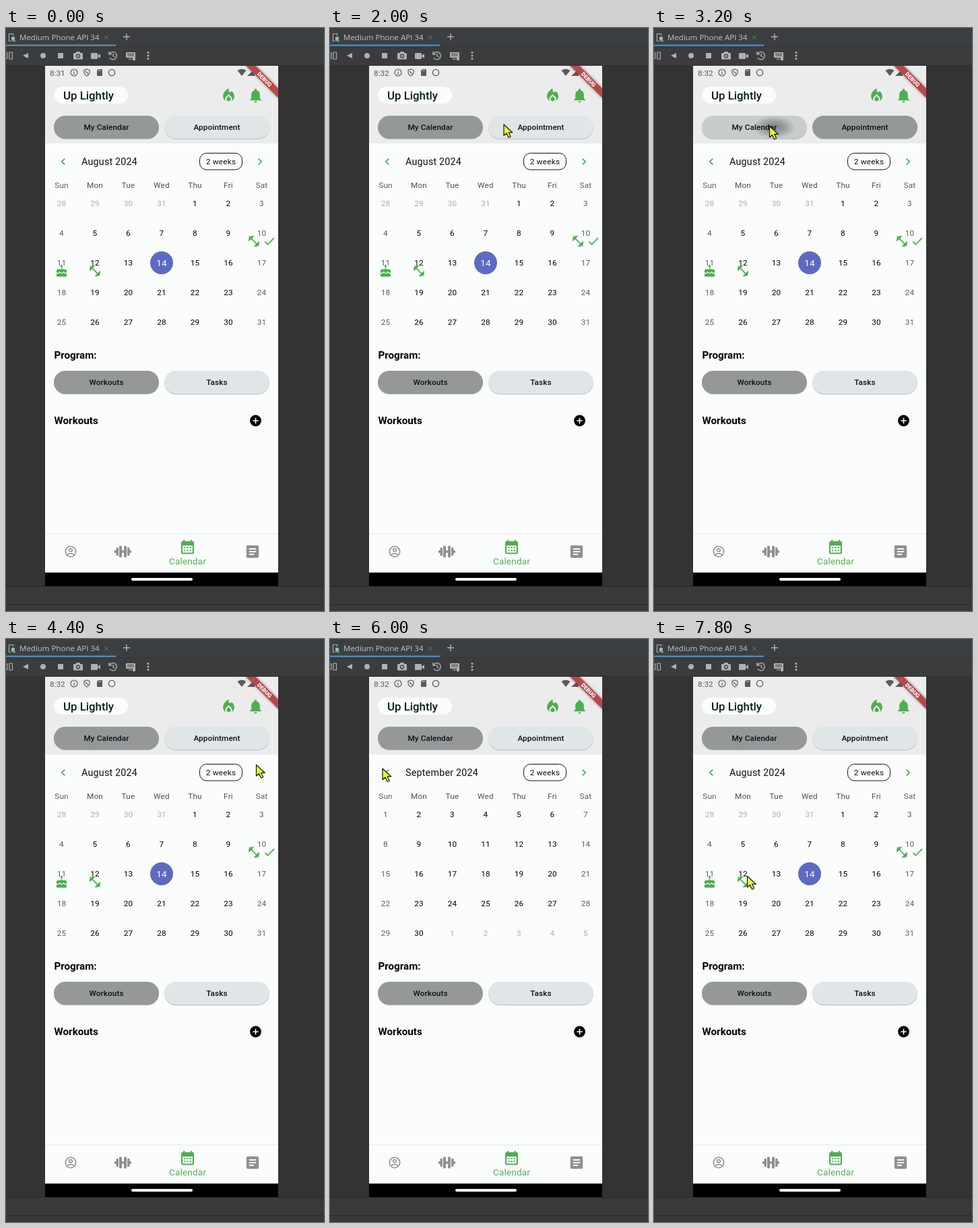
An HTML page that plays this animation: 472x864 px, repeating every 8000 ms.

```html
<!DOCTYPE html>
<html lang="en">
<head>
<meta charset="utf-8">
<style>
html, body { margin: 0; width: 100%; height: 100%; overflow: hidden; background: #333; }
svg { display: block; width: 472px; height: 864px; }
text { font-family: Roboto, sans-serif; font-size: 11.8px; white-space: pre; }
.sp { letter-spacing: .21px; }
</style>
</head>
<body>
<svg id="stage" viewBox="0 0 472 864" xmlns="http://www.w3.org/2000/svg"></svg>
<script>
const GREEN = '#4caf50', GREY = '#8f9190', ON = '#949899', OFF = '#e0e5e7';
const PAGE = '#fbfdfc', TOOL = '#afb1b3', STATUS = '#5b5b5b';

const rect = (x, y, w, h, fill, r = 0, more = '') =>
  `<rect x="${x}" y="${y}" width="${w}" height="${h}" rx="${r}" fill="${fill}" ${more}/>`;
const text = (s, x, y, fill, more = '') => `<text x="${x}" y="${y}" fill="${fill}" ${more}>${s}</text>`;
const mid = (s, x, y, fill, more = '') => text(s, x, y, fill, 'text-anchor="middle" ' + more);
const line = (d, color, w = 1.2) => `<path d="${d}" fill="none" stroke="${color}" stroke-width="${w}"/>`;
const fill = (d, color) => `<path d="${d}" fill="${color}"/>`;
const ring = (x, y, r, color, w = 1.2) =>
  `<circle cx="${x}" cy="${y}" r="${r}" fill="none" stroke="${color}" stroke-width="${w}"/>`;
const dot = (x, y, r, color) => `<circle cx="${x}" cy="${y}" r="${r}" fill="${color}"/>`;

// Icons on a 24 unit grid, centred on (x, y)
const shapes = {
  left: 'M15.41 7.41L14 6l-6 6 6 6 1.41-1.41L10.83 12z',
  right: 'M10 6L8.59 7.41 13.17 12l-4.58 4.59L10 18l6-6z',
  bell: 'M12 22c1.1 0 2-.9 2-2h-4c0 1.1.89 2 2 2zm6-6v-5c0-3.07-1.64-5.64-4.5-6.32V4c0-.83-.67-1.5-1.5-1.5s-1.5.67-1.5 1.5v.68C7.63 5.36 6 7.92 6 11v5l-2 2v1h16v-1l-2-2z',
  fire: 'M12 12.9l-2.13 2.09C9.31 15.55 9 16.28 9 17.06 9 18.68 10.35 20 12 20s3-1.32 3-2.94c0-.78-.31-1.52-.87-2.07zM16 6l-.44.55C14.38 8.02 12 7.19 12 5.3V2S4 6 4 13c0 2.92 1.56 5.47 3.89 6.86-.56-.79-.89-1.76-.89-2.8 0-1.32.52-2.56 1.47-3.5L12 10.1l3.53 3.47c.95.93 1.47 2.17 1.47 3.5 0 1.02-.31 1.96-.85 2.75 1.89-1.15 3.29-3.06 3.71-5.3.66-3.55-1.07-6.9-3.86-8.52z',
  cake: 'M12 6c1.11 0 2-.9 2-2 0-.38-.1-.73-.29-1.03L12 0l-1.71 2.97c-.19.3-.29.65-.29 1.03 0 1.1.9 2 2 2zm4.6 9.99l-1.07-1.07-1.08 1.07c-1.3 1.3-3.58 1.31-4.89 0l-1.07-1.07-1.09 1.07C6.75 16.64 5.88 17 4.96 17c-.73 0-1.4-.23-1.96-.61V21c0 .55.45 1 1 1h16c.55 0 1-.45 1-1v-4.61c-.56.38-1.23.61-1.96.61-.92 0-1.79-.36-2.44-1.01zM18 9h-5V7h-2v2H6c-1.66 0-3 1.34-3 3v1.54c0 1.08.88 1.96 1.96 1.96.52 0 1.02-.2 1.38-.57l2.14-2.13 2.13 2.13c.74.74 2.03.74 2.77 0l2.14-2.13 2.13 2.13c.37.37.86.57 1.38.57 1.08 0 1.96-.88 1.96-1.96V12c0-1.66-1.34-3-3-3z',
  weights: 'M20.57 14.86L22 13.43 20.57 12 17 15.57 8.43 7 12 3.43 10.57 2 9.14 3.43 7.71 2 5.57 4.14 4.14 2.71 2.71 4.14l1.43 1.43L2 7.71l1.43 1.43L2 10.57 3.43 12 7 8.43 15.57 17 12 20.57 13.43 22l1.43-1.43L16.29 22l2.14-2.14 1.43 1.43 1.43-1.43-1.43-1.43L22 16.29z',
  check: 'M9 16.17L4.83 12l-1.42 1.41L9 19 21 7l-1.41-1.41z',
  add: 'M12 2a10 10 0 1 0 0 20 10 10 0 0 0 0-20zm5 11h-4v4h-2v-4H7v-2h4V7h2v4h4z',
  month: 'M19 4h-1V2h-2v2H8V2H6v2H5a2 2 0 0 0-2 2v14a2 2 0 0 0 2 2h14a2 2 0 0 0 2-2V6a2 2 0 0 0-2-2zm0 16H5V10h14zM9 14H7v-2h2zm4 0h-2v-2h2zm4 0h-2v-2h2zm-8 4H7v-2h2zm4 0h-2v-2h2zm4 0h-2v-2h2z',
  article: 'M19 3H5a2 2 0 0 0-2 2v14a2 2 0 0 0 2 2h14a2 2 0 0 0 2-2V5a2 2 0 0 0-2-2zm-5 14H7v-2h7zm3-4H7v-2h10zm0-4H7V7h10z'
};
const icon = (name, x, y, color = GREEN, s = .842) =>
  `<path transform="translate(${x} ${y}) scale(${s}) translate(-12 -12)" d="${shapes[name]}" fill="${color}" fill-rule="evenodd"/>`;

const button = (label, x, y, color, id = '') =>
  rect(x, y + .8, 156, 34.2, '#b9bdbe', 17) + rect(x, y, 156, 34, color, 17, id && `id="${id}"`) +
  `<g id="${id}Splash"></g>` + mid(label, x + 78, y + 21.4, '#0b1114', 'font-weight="500" letter-spacing=".08"');

// Five weeks of day numbers; start is the first cell relative to day 1
function month(id, title, start, length, before) {
  let out = `<g id="${id}">` + text(title, 112, 203, '#111', 'class="sp" style="font-size:14.3px"');
  for (let i = 0; i < 35; i++) {
    const n = start + i, col = i % 7, outside = n < 1 || n > length;
    const day = n < 1 ? n + before : n > length ? n - length : n;
    const x = 82.5 + 49.5 * col, y = 260 + 44 * Math.floor(i / 7);
    if (id === 'aug' && n === 14) {
      out += dot(x, y, 17, '#5c6bc0') + mid(day, x, y + 4.8, '#fafafa', 'class="sp" style="font-size:13.5px"');
    } else {
      const color = outside ? '#aeaeae' : col % 6 ? '#000' : '#5a5a5a';
      out += mid(day, x, y + 4.3, color, 'class="sp"');
    }
  }
  if (id === 'aug') out += icon('weights', 368, 316) + icon('check', 391, 316) +
    icon('cake', 82.5, 360) + icon('weights', 132, 360);
  return out + '</g>';
}

const ide =
  rect(0, 0, 472, 864, '#333') + rect(0, 0, 472, 27, '#3c3f41') + rect(0, 27, 472, 1, '#323232') +
  rect(0, 28, 472, 27, '#3a3c3e') + rect(0, 55, 472, 1, '#313131') +
  rect(0, 24.5, 163, 2.5, '#6b8296', 0, 'id="focus"') +
  line('M4.5 8.5h6v3M4.5 8.5v11h3', TOOL) + rect(8, 13, 5, 6, TOOL, 1) + dot(12, 19, 2, GREEN) +
  text('Medium Phone API 34', 20, 18, '#c3c5c7', 'style="font:11.5px Open Sans,sans-serif"') +
  line('M146 11l6 6m0-6l-6 6', '#6f7274', 1) + line('M174 13h10M179 8v10', TOOL, 1.4) +
  line('M0 37h2v8H0M5 36h4.5v10H5z', TOOL) + fill('M33 37v8l-8-4z', TOOL) + dot(55, 41, 4, TOOL) + rect(77, 37, 8, 8, TOOL) +
  rect(100, 37, 14, 9.5, TOOL, 1) + rect(104, 35, 6, 4, TOOL, 1) + dot(107, 41.5, 3.1, '#3a3c3e') + dot(107, 41.5, 1.8, TOOL) +
  rect(126, 37, 10, 9, TOOL, 1) + fill('M136 41l4-3v7l-4-3z', TOOL) +
  line('M154 38a5.6 5.6 0 1 1-.2 6M153 35v4h4M159 38v3.5l2.5 1.5', TOOL, 1.4) +
  rect(178, 36, 14, 8, TOOL, 1) + line('M180 38.5h10M180 41h10', '#3a3c3e', 1) + line('M182 46h5', TOOL) + rect(188, 42, 4, 6, TOOL, 1) +
  [36.5, 41, 45.5].map(y => dot(211, y, 1.5, TOOL)).join('') +
  rect(0, 827, 472, 37, '#37393b') + rect(0, 827, 472, 1, '#282828') + rect(0, 854, 472, 1, '#292929');

const statusBar =
  text('8:31', 65, 70.5, STATUS, 'id="clock"') +
  ring(101, 66, 5, STATUS) + line('M101 65v4M101 62.8v1.2', STATUS) +
  line('M120 61l4 1.5v3q0 3.5-4 5.5-4-2-4-5.5v-3z', STATUS) + line('M118 64l4 4', STATUS) +
  fill('M137 61h6v10h-8v-8z', STATUS) + line('M138 62v2M140 62v2', '#ececec', .8) +
  ring(157, 66, 4.6, STATUS, 1.4) +
  fill('M343.5 63q6.500-4.500 13 0l-6.500 8z', STATUS) + fill('M369 61v10h-11z', STATUS);

const banner = '<g clip-path="url(#screen)"><g transform="translate(404 56) rotate(45)">' +
  rect(-34, 23.6, 68, 10.1, '#b5484b', 0, 'filter="url(#soft)"') +
  mid('DEBUG', 0, 31.6, '#fff', 'style="font-size:8.4px;font-weight:900"') + '</g></g>';

const header =
  rect(58, 56, 346, 771, PAGE) + rect(58, 56, 346, 115, '#ececec') + statusBar +
  rect(71, 87, 110, 25, PAGE, 12.5) +
  text('Up Lightly', 85, 106, '#0c1b20', 'style="font-size:16.84px;font-weight:500"') +
  icon('fire', 330.5, 100, GREEN, 1.05) + icon('bell', 370.5, 100, GREEN, 1.05) +
  button('My Calendar', 71, 130, ON, 'mine') + button('Appointment', 235, 130, OFF, 'visit');

const calendar =
  '<circle id="hover" cx="85" cy="198" r="20" fill="#f1f3f2"/>' +
  icon('left', 85, 198) + icon('right', 377, 198) +
  rect(287.5, 185.5, 63, 24.5, 'none', 10, 'stroke="#111"') + mid('2 weeks', 319, 202.2, '#111', 'class="sp"') +
  ['Sun', 'Mon', 'Tue', 'Wed', 'Thu', 'Fri', 'Sat']
    .map((d, i) => mid(d, 82.5 + 49.5 * i, 237.3, i % 6 ? '#4f4f4f' : '#5c5c5c', 'class="sp"')).join('') +
  month('aug', 'August 2024', -3, 31, 31) + month('sep', 'September 2024', 1, 30, 31);

const heading = 'style="font-size:15.16px;font-weight:600"';
const lower =
  text('Program:', 71.5, 490.3, '#000', heading) +
  button('Workouts', 71, 508, ON) + button('Tasks', 235, 508, OFF) +
  text('Workouts', 71.5, 587.3, '#000', heading) + icon('add', 370.5, 582, '#000') +
  rect(58, 749, 346, 1.5, '#eceeed') +
  ring(96, 776, 7.7, GREY, 1.6) + ring(96, 773.7, 2.3, GREY, 1.5) + line('M90.500 781q5.500-4.500 11 0', GREY, 1.6) +
  [[161, 774, 3, 4], [163.5, 770, 3.5, 12], [168, 767.5, 4, 17], [173.5, 774.5, 0, 3], [171, 774.5, 5, 3], [176, 774.8, 0, 2]]
    .map(([x, y, w, h]) => rect(x, y, w, h, GREY, 1) + rect(347 - x - w, y, w, h, GREY, 1)).join('') +
  icon('month', 269.5, 769, GREEN, 1.05) + icon('article', 366, 776, GREY, 1.02) +
  mid('Calendar', 269.5, 795, GREEN, 'class="sp" style="font-size:13.47px"') +
  rect(58, 807, 346, 20, '#000') + rect(186, 815, 91, 4, '#fff', 2);

const pointer = '<path id="cursor" d="M0 0V16.500l4-3.500 3 6.500 3.200-1.500-3-6.200h5.500z" fill="#e4f63c" stroke="#1b1b10" stroke-width="1.2" stroke-linejoin="round"/>';

document.getElementById('stage').innerHTML = `<defs>
  <clipPath id="screen"><path d="M58 56h346v771H58z"/></clipPath>
  <filter id="soft" x="-20%" y="-80%" width="140%" height="260%"><feDropShadow dx="0" dy="0" stdDeviation="2" flood-opacity=".4"/></filter>
  <radialGradient id="splash"><stop stop-color="#858889"/><stop offset=".45" stop-color="#969999"/><stop offset="1" stop-color="#949899" stop-opacity="0"/></radialGradient>
</defs>` + ide + header + calendar + lower + banner + pointer;

const $ = id => document.getElementById(id);
const show = (id, on) => $(id).setAttribute('display', on ? 'inline' : 'none');
const paint = (id, color) => $(id).setAttribute('fill', color);
$('visitSplash').innerHTML = dot(262, 147, 17, 'url(#splash)');
$('mineSplash').innerHTML = `<ellipse cx="178" cy="147" rx="32" ry="17" fill="url(#splash)"/>`;

// Pointer route: time, x, y
const route = [
  [800, 44, 27], [1600, 258, 143], [2400, 258, 143], [3200, 171.5, 145.5], [3400, 171.5, 145.5],
  [4200, 340, 160], [4400, 371.5, 186.5], [4800, 386, 219], [5400, 374, 194], [6000, 78, 192],
  [6600, 78, 192], [6800, 158.5, 162.5], [7600, 263.5, 338.5], [7800, 138.5, 351.5]
];
function place(t) {
  const i = route.findIndex(p => p[0] >= t);
  if (i <= 0) return route[0].slice(1);
  const a = route[i - 1], b = route[i], k = (t - a[0]) / (b[0] - a[0]);
  return [a[1] + (b[1] - a[1]) * k, a[2] + (b[2] - a[2]) * k];
}

function draw(now) {
  const t = Math.floor(now % 8000 / 200) * 200;
  const visiting = t >= 2400 && t < 3400;
  const september = t >= 5600 && t < 6600;
  $('clock').textContent = t < 200 ? '8:31' : '8:32';
  paint('focus', t < 2000 ? '#6b8296' : '#4a88c7');
  paint('mine', t === 3200 ? '#c9cccd' : visiting ? OFF : ON);
  paint('visit', t === 2200 ? '#c9cccd' : visiting ? ON : OFF);
  show('visitSplash', t === 2200);
  show('mineSplash', t === 3200);
  show('aug', !september);
  show('sep', september);
  show('hover', t === 6600 || t === 6800);
  show('cursor', t >= 800);
  $('cursor').setAttribute('transform', `translate(${place(t)})`);
}
const begin = performance.now();
function tick() {
  draw(performance.now() - begin);
  requestAnimationFrame(tick);
}
tick();
</script>
</body>
</html>
```
